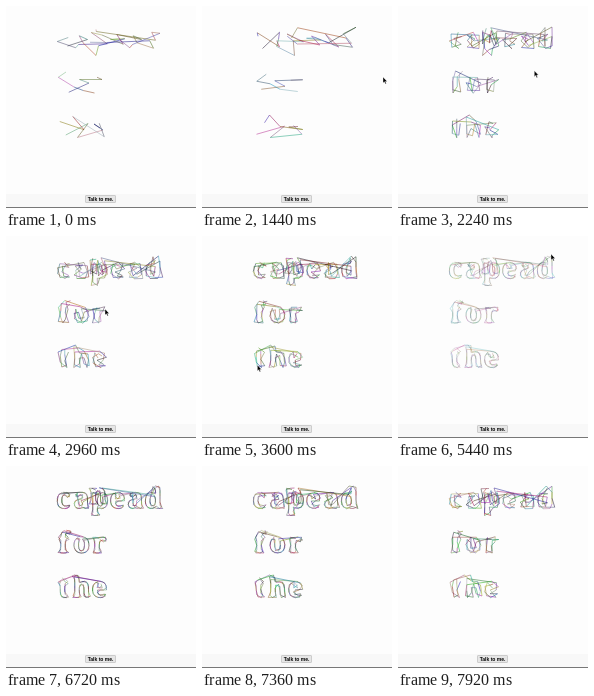
Recreate the animation shown at these times as an HTML page with a canvas. Size 190 px wide and 202 px high, loop 8000 ms.

```html
<!DOCTYPE html>
<html>
<head>
<meta charset="utf-8">
<style>
  html, body { margin: 0; width: 100%; height: 100%; overflow: hidden; background: #f8f8f8; }
  canvas { position: absolute; left: 0; top: 0; }
  #talk {
    position: absolute; left: 79px; top: 189px; width: 31px; height: 8px; box-sizing: border-box;
    border: 1px solid #ccc; border-radius: 1px; background: #e6e6e6; color: #000;
    font: bold 5px/6px "Liberation Sans", Arial, sans-serif; text-align: center; white-space: nowrap;
  }
</style>
</head>
<body>
<div id="talk"><span>Talk to me.</span></div>
<canvas id="stage" width="190" height="202"></canvas>
<script>
const LOOP = 8000, STEP = 80, SCALE = 4, PITCH = 18;
const ctx = document.getElementById('stage').getContext('2d');
const clamp = v => Math.min(1, Math.max(0, v));

// Pointer stops: time, x, y
const pointer = [
  [1280, 189, 78], [1440, 181, 71], [1840, 157, 60], [2960, 99, 73],
  [3840, 39, 150], [4320, 79, 184], [4640, 84, 187], [5440, 153, 18], [6080, 95, 184]
];

function rng(seed) {
  return () => {
    seed = seed + 0x6D2B79F5 | 0;
    let v = Math.imul(seed ^ seed >>> 15, 1 | seed);
    v ^= v + Math.imul(v ^ v >>> 7, 61 | v);
    return ((v ^ v >>> 14) >>> 0) / 4294967296;
  };
}

// Follows the pixel edges of a rendered letter and returns its closed outlines
function outlines(letter, cx, base) {
  const w = 44 * SCALE, h = 48 * SCALE;
  const c = new OffscreenCanvas(w, h).getContext('2d', { willReadFrequently: true });
  c.font = `600 ${29.5 * SCALE}px "Noto Serif", "DejaVu Serif", serif`;
  c.textAlign = 'center';
  c.fillText(letter, w / 2, 34 * SCALE);
  const data = c.getImageData(0, 0, w, h).data;
  const inside = (x, y) => data[(y * w + x) * 4 + 3] > 127;
  const edges = new Map();
  const add = (x, y, x2, y2) => {
    const key = y * w + x;
    if (!edges.has(key)) edges.set(key, []);
    edges.get(key).push(y2 * w + x2);
  };
  for (let y = 1; y < h - 1; y++) for (let x = 1; x < w - 1; x++) {
    if (!inside(x, y)) continue;
    if (!inside(x, y - 1)) add(x, y, x + 1, y);
    if (!inside(x + 1, y)) add(x + 1, y, x + 1, y + 1);
    if (!inside(x, y + 1)) add(x + 1, y + 1, x, y + 1);
    if (!inside(x - 1, y)) add(x, y + 1, x, y);
  }
  const paths = [];
  for (const start of edges.keys()) {
    const path = [];
    let at = start;
    while (edges.get(at).length) {
      path.push([cx - 22 + at % w / SCALE, base - 34 + Math.floor(at / w) / SCALE]);
      at = edges.get(at).pop();
    }
    if (path.length > 8 * SCALE) paths.push(path);
  }
  return paths;
}

const words = ['capead', 'for', 'the'].map((word, row) =>
  [...word].flatMap((letter, i) => outlines(letter, 57.5 + PITCH * i, 42.5 + 44.5 * row)));
words[0].push(...outlines('n', 92, 38)); // overlaps the third letter

function drawWord(paths, count, rand) {
  const reach = 2;
  const pts = paths.flatMap(path => {
    const n = Math.max(2, Math.round(path.length / SCALE * count / 100));
    const shift = rand();
    return Array.from({ length: n }, (_, i) => path[Math.floor((i + shift) / n * path.length)]);
  });
  for (let i = 0; i + reach < pts.length; i++) {
    const [r, g, b] = [0, 0, 0].map(() => Math.floor(rand() * 180));
    ctx.strokeStyle = `rgb(${r},${g},${b})`;
    ctx.beginPath();
    ctx.moveTo(...pts[i]);
    ctx.lineTo(...pts[i + reach]);
    ctx.stroke();
  }
}

function drawPointer(t) {
  const i = pointer.findIndex(p => p[0] > t);
  if (i < 1) return;
  const [t0, x0, y0] = pointer[i - 1], [t1, x1, y1] = pointer[i];
  const u = (t - t0) / (t1 - t0);
  ctx.save();
  ctx.translate(x0 + (x1 - x0) * u, y0 + (y1 - y0) * u);
  const arrow = new Path2D('M0 0V6L1.4 4.8 2.3 7 3.3 6.5 2.4 4.5 4.2 4.4Z');
  ctx.fillStyle = '#000';
  ctx.strokeStyle = '#fff';
  ctx.lineWidth = .4;
  ctx.fill(arrow);
  ctx.stroke(arrow);
  ctx.restore();
}

function draw(t) {
  ctx.clearRect(0, 0, 190, 202);
  ctx.fillStyle = '#fdfdfd';
  ctx.fillRect(0, 0, 190, 188);
  ctx.fillStyle = '#777';
  ctx.fillRect(0, 201, 190, 1);

  // Points per 100 px of outline: grows, then thins out again
  const count = 3.4 + 30 * clamp((t - 1440) / 5000) ** .75 - 17 * clamp((t - 6720) / 1200);
  const rand = rng(t * 7 + 11);
  ctx.globalAlpha = .9 - .45 * Math.exp(-(((t - 5440) / 600) ** 2));
  ctx.lineWidth = .55;
  for (const word of words) drawWord(word, count, rand);
  ctx.globalAlpha = 1;
  drawPointer(t);
}

let last = -1;
function tick() {
  const t = Math.floor(performance.now() % LOOP / STEP) * STEP;
  if (t !== last) draw(last = t);
  requestAnimationFrame(tick);
}
tick();
</script>
</body>
</html>
```
